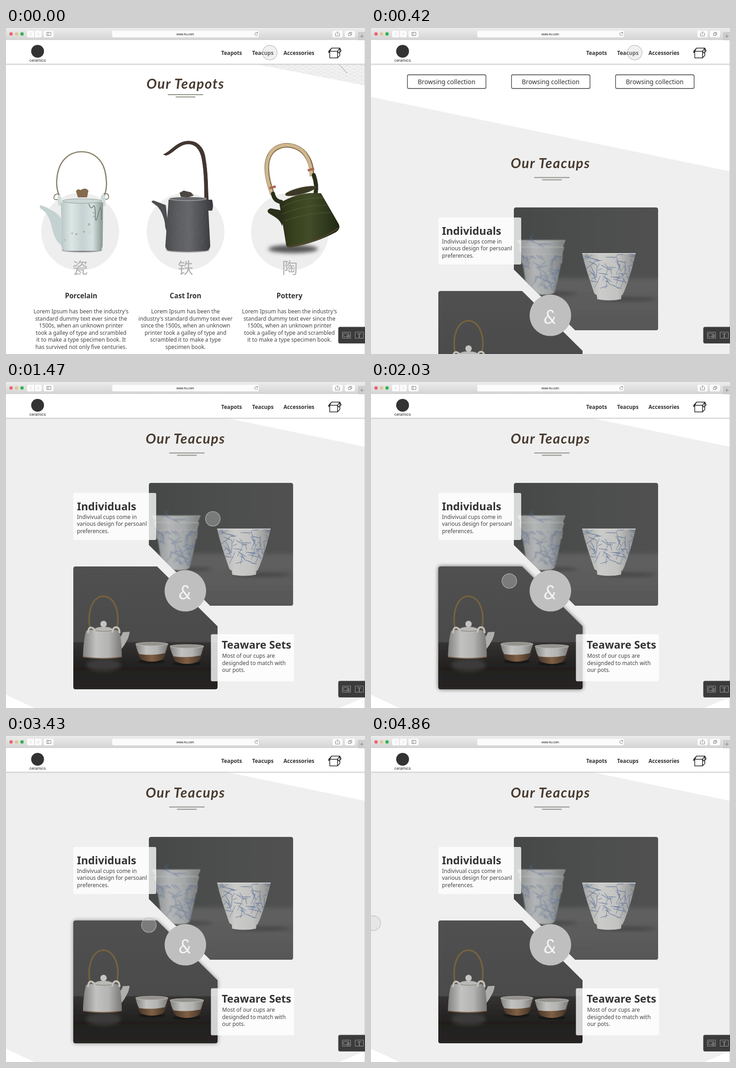
These frames come from a looping animation (784 by 714 pixels, 4930 ms). An HTML page:

```html
<!DOCTYPE html>
<html lang="en">
<head>
<meta charset="utf-8">
<title>Ceramics shop</title>
<style>
  html, body { margin: 0; width: 100%; height: 100%; overflow: hidden; background: #fff; }
  svg { display: block; width: 784px; height: 714px; font-family: "Noto Sans", "Open Sans", sans-serif; fill: none; }
  .title { font: italic 700 30px Lato, sans-serif; letter-spacing: 1.6px; }
  .han { font: 100 34px "Noto Sans CJK SC", "Noto Sans CJK", sans-serif; }
</style>
</head>
<body>
<svg id="stage" viewBox="0 0 784 714"></svg>
<script>
const LOOP = 4930, SCROLL = 801;
const stage = document.getElementById('stage');

let seed = 7;
const random = () => (seed = seed * 16807 % 2147483647) / 2147483647;

const text = (x, y, size, str, attrs = '') =>
  `<text x="${x}" y="${y}" font-size="${size}" fill="#333" ${attrs}>${str}</text>`;
const middle = 'text-anchor="middle"', bold = 'font-weight="700"';
const lines = (x, y, list, attrs) =>
  list.map((s, i) => text(x, y + i * 15.5, 11.9, s, 'fill-opacity=".92" ' + attrs)).join('');
const path = (d, attrs) => `<path d="${d}" ${attrs}/>`;
const rect = (x, y, w, h, r, attrs) => `<rect x="${x}" y="${y}" width="${w}" height="${h}" rx="${r}" ${attrs}/>`;
const circle = (x, y, r, attrs) => `<circle cx="${x}" cy="${y}" r="${r}" ${attrs}/>`;
const ellipse = (x, y, rx, ry, attrs) => `<ellipse cx="${x}" cy="${y}" rx="${rx}" ry="${ry}" ${attrs}/>`;
const gradient = (id, colors, vertical) =>
  `<linearGradient id="${id}" ${vertical ? 'x2="0" y2="1"' : ''}>` +
  colors.map((c, i) => `<stop offset="${i / (colors.length - 1)}" stop-color="${c}"/>`).join('') + '</linearGradient>';
const blur = (id, size) =>
  `<filter id="${id}" x="-30%" y="-60%" width="160%" height="220%"><feGaussianBlur stdDeviation="${size}"/></filter>`;

const title = (str, y, x, ruleY, color) =>
  text(392, y, 30, str, `${middle} class="title" style="fill:#483a2f"`) +
  path(`M${x} ${ruleY}h77m-60 5h43`, `stroke="${color}" stroke-width="2"`);

const rightCup = 'M461 321H578C572 350 562 383 553 405L549 413H547L546 422Q520 427 494 422L493 413L488 410C479 384 467 350 461 321Z';
const leftCup = 'M328 325H418C414 355 406 385 402 403Q401 409 393 411Q370 414 347 409Q342 405 340 396Z';
const upperCard = 'M317 221H622q5 0 5 5V485q0 5-5 5H446L312 357V226q0-5 5-5Z';
const lowerCard = 'M152 404H330L462 535V668q0 5-5 5H152q-5 0-5-5V409q0-5 5-5Z';

const defs = `<defs>
  ${gradient('bar', ['#ececec', '#d4d4d4'], true)}
  ${gradient('drop', ['#aaa', '#fff0'], true)}
  ${gradient('celadon', ['#b9c7c6', '#dbe7e5', '#c6d2d2', '#d5e1e0', '#87938f'])}
  ${gradient('iron', ['#4b4c4f', '#5c5d60', '#66676a', '#505155', '#37383b'])}
  ${gradient('olive', ['#272d17', '#39421f', '#424c28', '#323b1e', '#212713'])}
  ${gradient('wall', ['#454847', '#4c4e4d', '#505050'])}
  ${gradient('dusk', ['#505050', '#4b4b4b', '#484848'], true)}
  ${gradient('table', ['#353333', '#211f1e', '#292726'], true)}
  ${gradient('desk', ['#606060', '#565656'], true)}
  ${gradient('china', ['#a2a3a3', '#cbcbc9', '#c2c2c0', '#8b8c8c'])}
  ${gradient('blurred', ['#8f9293', '#b3b5b6', '#a5a8a9', '#7b7d7e'])}
  ${gradient('glaze', ['#828280', '#c2c2c0', '#b3b3b1', '#787775'])}
  ${gradient('clay', ['#3b2d23', '#806044', '#3b2d23'])}
  ${blur('soft', 1.1)}${blur('haze', 4)}${blur('lift', 5)}
  <clipPath id="upper">${path(upperCard, '')}</clipPath>
  <clipPath id="lower">${path(lowerCard, '')}</clipPath>
  <clipPath id="cupA">${path(rightCup, '')}</clipPath>
  <clipPath id="cupB">${path(leftCup, '')}</clipPath>
  <pattern id="waves" width="16" height="8" patternUnits="userSpaceOnUse">
    <path d="M0 8a8 8 0 0 1 16 0M3 8a5 5 0 0 1 10 0M-8 4a8 8 0 0 1 16 0M8 4a8 8 0 0 1 16 0" stroke="#e2e2e2"/>
  </pattern></defs>`;

// Thin blue bamboo leaves scattered over a cup
const leaves = (x, y, w, h, count) => {
  let d = '';
  for (let i = 0; i < count; i++) {
    const a = random() * 7, len = 10 + random() * 20, dx = Math.cos(a) * len, dy = Math.sin(a) * len;
    d += `M${x + random() * w} ${y + random() * h}q${dx / 2 + 2} ${dy / 2 - 1} ${dx} ${dy}q${-dx / 2 + 1} ${-dy / 2 + 1} ${-dx} ${-dy}`;
  }
  return path(d, 'stroke="#566d97" fill="#566d97" stroke-width=".6" opacity=".75"');
};

const speckles = (x, y, w, h, count, color, r) => {
  let s = '';
  for (let i = 0; i < count; i++) s += circle(x + random() * w, y + random() * h, r * (.5 + random()), `fill="${color}" opacity=".5"`);
  return s;
};

const porcelain = () =>
  ellipse(166, 486, 44, 5, 'fill="#777" filter="url(#soft)"') +
  path('M117 370C109 350 110 336 112 323C117 289 139 271 165 271C194 271 214 292 218 323C220 338 221 350 214 370', 'stroke="#888069" stroke-width="2.6"') +
  path('M117 364q-10-2-12 5t5 7t9-5M213 363q10-2 11 5t-5 7t-8-5', 'stroke="#888069" stroke-width="2"') +
  path('M120 417C111 402 102 402 91 394L76 388Q72 391 75 395C93 406 97 423 101 440Q107 466 121 476Z', 'fill="#c3d2d1"') +
  path('M113 369Q117 361 120 370L122 389H114ZM207 369Q213 359 217 369V390H208Z', 'fill="#cedbd9"') +
  path('M120 382Q166 376 212 382L211 478Q210 487 200 488H132Q122 488 121 478Z', 'fill="url(#celadon)"') +
  ellipse(166, 379, 43, 5, 'fill="#cbd7d5" stroke="#8d9894"') +
  path('M157 371L153 358Q155 351 163 355Q173 348 180 356L177 371Z', 'fill="#856a50"') +
  path('M181 385q4 14 9 6t5 18t7-4t6 15', 'stroke="#697975" stroke-width="1.5"') +
  speckles(128, 395, 78, 75, 8, '#99825b', 1.8);

const castIron = () =>
  ellipse(397, 486, 47, 5, 'fill="#666" filter="url(#soft)"') +
  path('M442 378C440 345 441 318 435 284C431 255 410 242 385 250C368 256 359 270 344 277L350 279C364 274 372 262 387 256C408 249 423 261 428 287C434 320 433 350 434 378Z', 'fill="#423630" stroke="#352b27"') +
  path('M347 427Q343 405 331 391L319 382Q316 378 323 378L349 388L356 452Q347 444 347 427Z', 'fill="#4d4e51"') +
  path('M355 376Q398 370 440 376H450Q454 390 450 400H442L446 477Q445 488 433 488H362Q348 488 348 477Z', 'fill="url(#iron)"') +
  ellipse(397, 374, 41, 4, 'fill="#66676a" stroke="#c4c4c4"') +
  path('M382 370L379 361L388 356L404 360L410 367L397 371Z', 'fill="#4c4643"') +
  speckles(356, 388, 82, 94, 110, '#999', .55);

const pottery = () =>
  ellipse(627, 484, 54, 9, 'fill="#555" filter="url(#haze)"') +
  path('M582 364C568 327 562 286 585 267C606 249 643 256 658 283Q668 298 668 325', 'stroke="#806849" stroke-width="10"') +
  path('M581 364C567 327 562 286 585 266C606 249 643 255 657 282Q667 298 667 325', 'stroke="#cfb78d" stroke-width="7"') +
  path('M575 351l14-4M659 312l14-4', 'stroke="#aa6952" stroke-width="5"') +
  path('M583 363q3 16 18 18M672 322Q680 345 676 362', 'stroke="#293019" stroke-width="9" stroke-linecap="round"') +
  path('M603 434C598 417 586 414 573 405Q568 398 578 395L610 401Z', 'fill="#29301a"') +
  path('M597 384Q640 357 688 362L727 430Q731 440 721 447Q676 471 625 480Q614 482 612 476Z', 'fill="url(#olive)"') +
  path('M602 393Q640 371 693 372M605 407Q650 388 700 388M608 423Q656 405 709 404', 'stroke="#566238" stroke-width="2" opacity=".45"') +
  ellipse(643, 357, 34, 7, 'fill="#3b3925" stroke="#665942" transform="rotate(-14 643 357)"') +
  path('M616 479Q680 470 726 438', 'stroke="#5b4532" stroke-width="2"');

const products = [
  [162, 164, '瓷', 'Porcelain', porcelain, ["Lorem Ipsum has been the industry's", 'standard dummy text ever since the',
    '1500s, when an unknown printer', 'took a galley of type and scrambled', 'it to make a type specimen book. It', 'has survived not only five centuries.']],
  [392, 392, '铁', 'Cast Iron', castIron, ['Lorem Ipsum has been the', "industry's standard dummy text ever",
    'since the 1500s, when an unknown', 'printer took a galley of type and', 'scrambled it to make a type', 'specimen book.']],
  [620, 619, '陶', 'Pottery', pottery, ["Lorem Ipsum has been the industry's", 'standard dummy text ever since the',
    '1500s, when an unknown printer', 'took a galley of type and scrambled', 'it to make a type specimen book.']]
];

const teapots = () =>
  path('M545 79L784 126V60H545Z', 'fill="#f3f3f3"') + path('M545 79L784 126V60H545Z', 'fill="url(#waves)"') +
  path('M727 79l18 20', 'stroke="#888"') +
  title('Our Teapots', 133, 353.5, 146, '#89917f') +
  products.map(([cx, x, han, name, draw, body], i) =>
    circle(cx, 446, 85, 'fill="#eee"') + draw() +
    text(cx, 538, 34, han, `${middle} class="han" style="fill:#b0b0b0"`) +
    text(x, 592, 15.2, name, `${middle} ${bold}`) + lines(x, 625, body, middle) +
    rect(79.5 + i * 227.3, 731.5, 171.5, 30, 3, 'stroke="#333" stroke-width="1.3"') +
    text(165 + i * 227.3, 751.5, 13.8, 'Browsing collection', `${middle} font-weight="500"`)).join('');

const cupPhoto = () => `<g clip-path="url(#upper)">
  ${rect(312, 221, 315, 269, 0, 'fill="url(#wall)"')}
  ${rect(300, 376, 340, 130, 0, 'fill="url(#desk)" filter="url(#haze)"')}
  ${ellipse(560, 422, 62, 4, 'fill="#424242" filter="url(#haze)"')}
  ${ellipse(400, 410, 50, 4, 'fill="#444" filter="url(#haze)"')}
  <g filter="url(#soft)">
    ${[293, 308, 325].map((y, i) => path(`M${320 + i * 4} ${y}H${424 - i * 3}L416 ${y + 18}H330Z`, 'fill="url(#blurred)" stroke="#ccc" stroke-width=".8"')).join('')}
    ${path(leftCup, 'fill="url(#blurred)"')}
    <g clip-path="url(#cupB)">${leaves(330, 325, 85, 78, 60)}</g>
    ${leaves(332, 297, 72, 5, 5)}
  </g>
  ${path(rightCup, 'fill="url(#china)"')}
  <g clip-path="url(#cupA)">${leaves(462, 322, 108, 78, 72)}</g>
  ${path('M461 322H578', 'stroke="#ddd" stroke-width="1.5"')}</g>`;

const bowl = (x, y, w) =>
  ellipse(x, y + 41, w * .4, 4, 'fill="#151413" filter="url(#soft)"') +
  path(`M${x - w / 2} ${y + 3}Q${x - w / 2 + 4} ${y + 29} ${x - 23} ${y + 37}Q${x} ${y + 46} ${x + 23} ${y + 37}Q${x + w / 2 - 3} ${y + 28} ${x + w / 2} ${y + 3}Z`, 'fill="url(#clay)"') +
  path(`M${x - w / 2} ${y + 3}Q${x - w / 2 + 3} ${y + 18} ${x - w / 2 + 8} ${y + 25}Q${x} ${y + 29} ${x + w / 2 - 7} ${y + 23}L${x + w / 2} ${y + 3}Z`, 'fill="url(#glaze)"') +
  ellipse(x, y + 3, w / 2, 4, 'fill="#94928d" stroke="#c0bdb7"');

const setPhoto = () => `<g clip-path="url(#lower)">
  ${rect(147, 404, 315, 269, 0, 'fill="url(#dusk)"')}
  ${rect(130, 570, 350, 115, 0, 'fill="url(#table)" filter="url(#soft)"')}
  ${ellipse(213, 620, 38, 14, 'fill="#555" opacity=".5" filter="url(#haze)"')}
  ${path('M185 545C176 515 184 470 213 469C241 470 251 515 240 546', 'stroke="#75623e" stroke-width="3.5"')}
  ${path('M240 562Q251 562 255 548L270 547Q269 558 263 568Q256 582 246 591Z', 'fill="#aeaeac"')}
  ${path('M175 545Q213 536 247 545Q252 560 253 602Q213 610 168 602Q169 565 175 545Z', 'fill="url(#glaze)"')}
  ${path('M168 602Q213 609 253 602', 'stroke="#795f47" stroke-width="2"')}
  ${path('M187 543Q213 528 239 543Q213 549 187 543Z', 'fill="#b9b9b7" stroke="#7b7266"')}
  ${circle(213, 530, 7, 'fill="#c4c4c2"')}
  ${path('M179 550q1-14 8-12t7 11M232 549q2-13 9-12t7 13', 'stroke="#c0c0be" stroke-width="4"')}
  ${bowl(318.5, 571, 71)}${bowl(395, 576, 74)}</g>`;

const teacups = () => `<g transform="translate(0 ${SCROLL})">
  ${path('M0-21L784 142V690L730 713L392 860L60 713L0 685Z', 'fill="#efefef"')}
  ${title('Our Teacups', 135, 356.5, 155.5, '#8d8d88')}
  ${cupPhoto()}
  ${path(lowerCard, 'id="shadow" fill="#000" filter="url(#lift)"')}
  ${setPhoto()}
  ${circle(391.7, 457.3, 45.3, 'fill="#bfbfbf"')}
  ${text(391, 476, 42, '&amp;', `${middle} style="font-family:Lato,sans-serif;font-style:italic;fill:#f4f4f4"`)}
  ${rect(147, 243, 181, 103, 3, 'fill="#fff" fill-opacity=".78"')}
  ${text(155, 281, 23.3, 'Individuals', bold)}
  ${lines(155, 299.5, ['Indivivual cups come in', 'various design for persoanl', 'preferences.'], '')}
  ${rect(447.5, 552.5, 181.5, 103, 3, 'fill="#fff" fill-opacity=".8"')}
  ${text(471, 584, 23.3, 'Teaware Sets', bold)}
  ${lines(472, 604, ['Most of our cups are', 'designded to match with', 'our pots.'], '')}</g>`;

const browser = () =>
  rect(0, 78, 784, 5, 0, 'fill="url(#drop)"') + rect(0, 26, 784, 52.5, 0, 'fill="#fff"') +
  rect(0, 0, 784, 26, 0, 'fill="url(#bar)"') + path('M0 25.7H784', 'stroke="#c4c4c4" stroke-width=".7"') +
  ['#ee6371', '#dfc49b', '#32b44c'].map((c, i) => circle(11 + i * 12, 13, 3.7, `fill="${c}"`)).join('') +
  [[46, 32], [82, 22], [232, 320], [713, 22], [740, 22]].map(([x, w]) => rect(x, 6, w, 14.5, 3, 'fill="#fbfbfb"')).join('') +
  rect(770, 10, 16, 16, 0, 'fill="#cfcfcf" stroke="#aaa" stroke-width=".7"') +
  path('M62.5 6v14.5M55.5 10l-3 3.2l3 3.2M69 10l3 3.2l-3 3.2', 'stroke="#ccc"') +
  path('M89 9.5h9v7h-9zM92 9.5v7M721 11.5h-1.5v6h9v-6h-1.5M724 14.5V8m-2 2l2-2l2 2M748 11.5h5v5h-5zM750 11.5v-2h5v5h-2M549 11a3.3 3.3 0 1 0 .7 3M549.5 9v2.5h-2.5M773 18h8M777 14v8', 'stroke="#777" stroke-width=".9"') +
  text(391.5, 15.7, 6.8, 'www.hu.com', `${middle} font-family="Liberation Sans, sans-serif" style="fill:#111"`) +
  circle(69, 51, 14, 'fill="#333"') +
  text(69, 74, 8.8, 'ceramics', `${middle} font-family="Roboto, sans-serif"`) +
  [[470, 'Teapots'], [537.5, 'Teacups'], [606, 'Accessories']].map(([x, s]) => text(x, 58.7, 11.7, s, bold)).join('') +
  path('M707 51H724V65.5H707ZM707 51L711 44H729L724 51M729 44V60L724 65.5M707 51L704 54.5M711 44L704 52M729 44L732 50L727 55L724 51', 'stroke="#222" stroke-width="1.5" stroke-linejoin="round"') +
  path('M783.6 26V714', 'stroke="#bbb" stroke-width=".8"') +
  rect(726, 655, 64, 35.5, 3, 'fill="#3b3b3b" stroke="#555"') +
  path('M734.5 666h18v13.5h-18zM762.5 666h18v13.5h-18zM737 669h11v7h-11zM745 672h5v5h-5z', 'stroke="#999"') +
  text(771.5, 677.5, 13, 'T', `${middle} font-family="Noto Serif, serif" style="fill:#aaa"`);

stage.innerHTML = defs + `<g id="page">${teapots()}${teacups()}</g>` + browser() +
  circle(0, 0, 16, 'id="cursor" fill="#d4d4d4" fill-opacity=".33" stroke="#bbb" stroke-opacity=".85" stroke-width="1.3"');

const [page, shadow, cursor] = ['page', 'shadow', 'cursor'].map(id => document.getElementById(id));

// Rows of [time, ...values], joined by straight segments
const track = (keys, t) => {
  const i = keys.findIndex(k => k[0] > t);
  if (i < 0) return keys[keys.length - 1].slice(1);
  if (i === 0) return keys[0].slice(1);
  const a = keys[i - 1], b = keys[i], p = (t - a[0]) / (b[0] - a[0]);
  return a.slice(1).map((v, n) => v + (b[n + 1] - v) * p);
};
const pointer = [[850, 576, 54], [1120, 550, 140], [1450, 460, 290], [1690, 365, 400], [1850, 325, 430], [2030, 302, 436],
  [2160, 318, 412], [2400, 350, 378], [2870, 366, 362], [3150, 358, 372], [3350, 325, 408], [3600, 285, 427],
  [3920, 260, 429], [4100, 170, 426], [4300, 60, 416], [4480, 5, 410]];
const hover = [[1690, 0], [1850, 1], [2060, 1], [2230, 0], [3300, 0], [3480, 1], [3800, 1], [3920, .6], [4120, 0]];

function draw(now) {
  const t = now % LOOP;
  const p = Math.min(1, Math.max(0, (t - 60) / 500));
  const eased = .29 * p + .71 * p * p * (3 - 2 * p);
  page.setAttribute('transform', `translate(0 ${-Math.round(SCROLL * eased)})`);
  shadow.setAttribute('opacity', track(hover, t)[0] * .6);
  cursor.setAttribute('transform', `translate(${track(pointer, t)})`);
  requestAnimationFrame(draw);
}
draw(performance.now());
</script>
</body>
</html>
```
